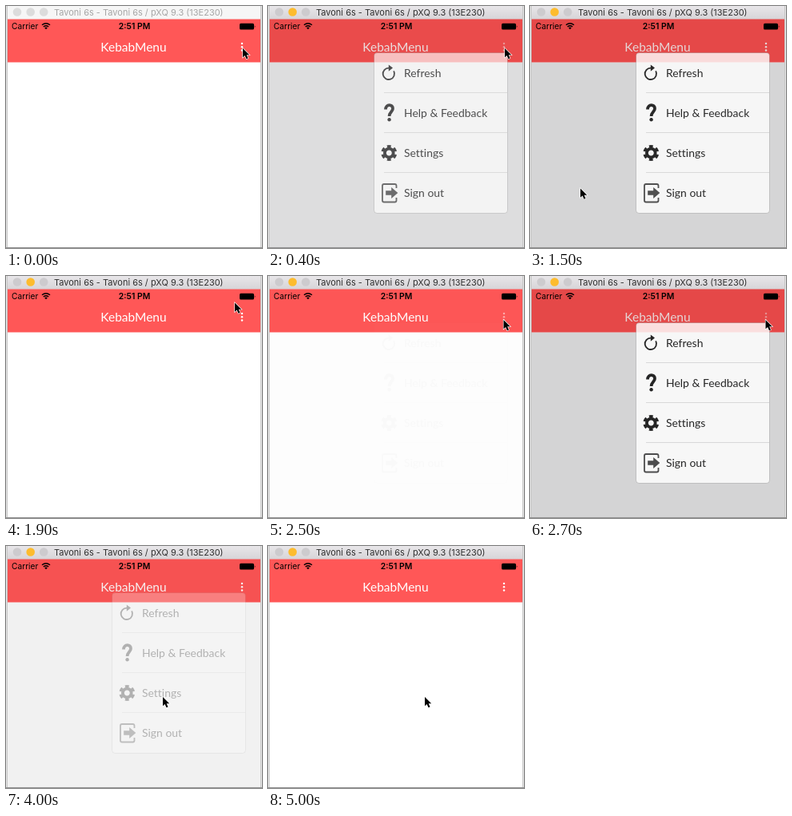
Animation of 320x303 px, one loop 5.1 s. Source, as an HTML page:

```html
<!DOCTYPE html>
<html lang="en">
<head>
<meta charset="utf-8">
<title>Kebab menu</title>
<style>
  html, body { margin: 0; width: 100%; height: 100%; overflow: hidden; background: #e4e4e4; }
  svg { display: block; width: 320px; height: 303px; }
  .ui { font-family: Inter, "Liberation Sans", sans-serif; }
  .app { font-family: Lato, "Open Sans", sans-serif; font-variant-ligatures: none; }
  #bar { fill: #f6f6f6; }
  .light { fill: #dcdcdc; }
  #caption { fill: #a6a6a6; }
  .active #bar { fill: url(#chrome); }
  .active .light { fill: #cdcbce; }
  .active #minimise { fill: #fdbc2e; }
  .active #caption { fill: #303030; }
</style>
</head>
<body>
<svg viewBox="0 0 320 303">
  <defs>
    <linearGradient id="chrome" x2="0" y2="1">
      <stop stop-color="#e8e6e9"/><stop offset="1" stop-color="#d6d4d7"/>
    </linearGradient>
  </defs>
  <path d="M0 0H320V303H0Z" fill="#e4e4e4"/>
  <path d="M1.5 0V303M318.5 0V303" stroke="#c6c6c6"/>

  <g id="window" class="ui" font-size="11">
    <path id="bar" d="M2 0H318V17H2Z"/>
    <circle class="light" cx="14" cy="7.5" r="5.3"/>
    <circle class="light" id="minimise" cx="30.7" cy="7.5" r="5.3"/>
    <circle class="light" cx="47.2" cy="7.5" r="5.3"/>
    <text id="caption" x="60" y="12">Tavoni 6s - Tavoni 6s / pXQ 9.3 (13E230)</text>
  </g>

  <path d="M2 70H318V303H2Z" fill="#fff"/>
  <path d="M2 16.5H318V70.5H2Z" fill="#ff5757"/>
  <text class="app" x="159.5" y="57" font-size="15.5" fill="#fff" text-anchor="middle">KebabMenu</text>
  <g id="kebab" fill="#fff">
    <circle cx="295" cy="47" r="1.25"/><circle cx="295" cy="51.2" r="1.25"/><circle cx="295" cy="55.4" r="1.25"/>
  </g>
  <g id="dim">
    <path d="M2 16.5H318V70.5H2Z" fill="#600"/>
    <path d="M2 70.5H318V303H2Z" fill="#040008"/>
  </g>

  <g class="ui" font-size="10.2">
    <text x="7" y="29">Carrier</text>
    <text x="160.5" y="29" font-size="10.4" font-weight="600" text-anchor="middle">2:51 PM</text>
    <path d="M45 23.8Q50 19.6 55 23.8M46.8 26Q50 23.4 53.2 26" fill="none" stroke="#000" stroke-width="1.4"/>
    <path d="M48.2 27.2Q50 25.8 51.8 27.2L50 29.3Z"/>
    <rect x="292" y="21.7" width="18" height="7.8" rx="1.6"/>
    <path d="M310.8 24.2q1.6 1.5 0 3Z"/>
  </g>

  <g id="menu">
    <rect x="132.5" y="58.5" width="167" height="201" rx="4" fill="#fff" stroke="#000" stroke-opacity=".2"/>
    <g id="rows" class="app" font-size="13.95"></g>
    <path d="M157.2 81.4A7.2 7.2 0 1 1 151 77.6" fill="none" stroke="#000" stroke-width="1.8"/>
    <path d="M150.8 73.4V81.8L156 77.6Z"/>
    <path d="M147 129.6C147 122.3 156.4 122.6 156 128.7C155.8 132.3 151.6 133 151.6 138" fill="none" stroke="#000" stroke-width="3.8"/>
    <circle cx="151.6" cy="142.2" r="2.2"/>
    <g transform="translate(151.3 184)" fill="none" stroke="#000">
      <circle r="5.4" stroke-width="3.8"/>
      <circle r="8.2" stroke-width="3.6" pathLength="12" stroke-dasharray="1.1 .9" stroke-dashoffset="-.45"/>
    </g>
    <path d="M160.5 228V225q0-2-2-2H145q-2 0-2 2V243.5q0 2 2 2H158.500q2 0 2-2V240" fill="none" stroke="#303030" stroke-width="1.8"/>
    <path d="M147.2 231.3H154.2V227L162.300 234L154.200 241V236.700H147.200Z" fill="#303030"/>
  </g>

  <path d="M0 302.5H320" stroke="#929292"/>
  <path id="cursor" d="M0 0V13L3 10.300L5.200 15.300L7.500 14.300L5.400 9.500H9.500Z" stroke="#fff" stroke-width="1.4" paint-order="stroke"/>
</svg>
<script>
  const LOOP = 5100, STEP = 100, FADE = 300;
  const visits = [{ show: 220, hide: 1415 }, { show: 2480, hide: 3800 }];
  const home = { x: 296, y: 53 };
  const moves = [
    { at: 700, time: 500, x: 63, y: 228.5 },
    { at: 1500, time: 400, x: 286, y: 33.5 },
    { at: 1900, time: 200, x: 294.5, y: 55 },
    { at: 3100, time: 400, x: 196, y: 189 },
  ];
  const el = id => document.getElementById(id);

  el("rows").innerHTML = ["Refresh", "Help &amp; Feedback", "Settings", "Sign out"]
    .map((label, i) => `<text x="170" y="${88.5 + 50 * i}">${label}</text>` +
      (i ? `<path d="M145 ${58.5 + 50 * i}H299" stroke="#dadada"/>` : "")).join("");

  // Smooth 0 to 1 ramp
  function ease(t, start, time) {
    const k = Math.min(1, Math.max(0, (t - start) / time));
    return k * k * (3 - 2 * k);
  }

  function cursorAt(t) {
    return moves.reduce((p, m) => {
      const k = ease(t, m.at, m.time);
      return { x: p.x + (m.x - p.x) * k, y: p.y + (m.y - p.y) * k };
    }, home);
  }

  function draw(t) {
    const open = Math.max(...visits.map(v => ease(t, v.show, FADE) - ease(t, v.hide, FADE)));
    const pressed = visits.some(v => t > v.show - 120 && t < v.show + FADE);
    const { x, y } = cursorAt(t);
    el("window").classList.toggle("active", t >= 100);
    el("kebab").setAttribute("opacity", pressed ? .5 : 1);
    el("dim").setAttribute("opacity", .2 * open);
    el("menu").setAttribute("opacity", open);
    el("cursor").setAttribute("transform", `translate(${x} ${y}) scale(.87)`);
  }

  function tick() {
    const t = performance.now() % LOOP;
    draw(Math.floor(t / STEP) * STEP);
    requestAnimationFrame(tick);
  }
  tick();
</script>
</body>
</html>
```
